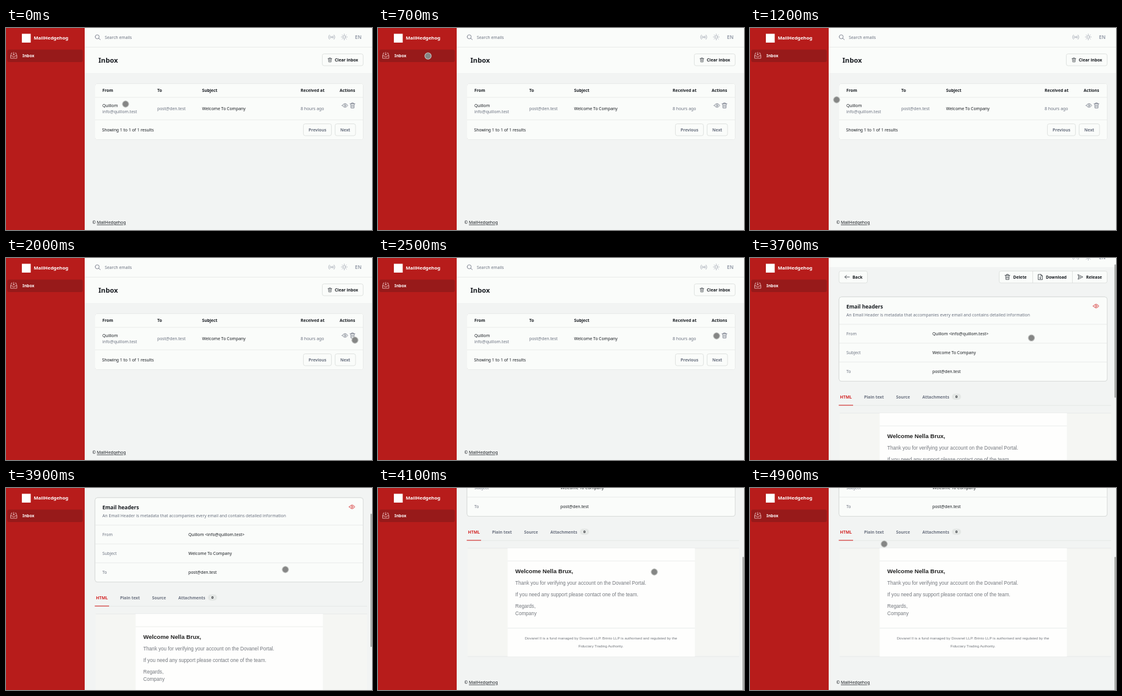
An HTML page that plays this animation: 600 px wide and 332 px high, repeating every 5000 ms.

```html
<!DOCTYPE html>
<html lang="en">
<head>
<meta charset="utf-8">
<title>Inbox</title>
<style>
  html, body { margin: 0; width: 100%; height: 100%; overflow: hidden; background: #f2f4f3; }
  svg { display: block; width: 100vw; height: 100vh; }
  text { font: 6.85px "Noto Sans", "Open Sans", sans-serif; fill: #171b20; }
  .semi { font-weight: 600; font-size: 6.8px; }
  .mid { font-weight: 500; }
  .bold { font-weight: 700; font-size: 6.8px; }
  .grey { fill: #6b7280; }
  .white { fill: #fff; }
  .red { fill: #d32626; }
  .panel { fill: #fafcfa; }
  .box { fill: #fafcfa; stroke: #d5d8d6; stroke-width: .7; }
  .rule { fill: none; stroke: #e1e4e2; stroke-width: .7; }
  .icon { fill: none; stroke: #6b7280; stroke-width: .8; stroke-linecap: round; stroke-linejoin: round; }
  .dark { stroke: #30363d; }
  .mail text { font-family: "Liberation Sans", Arial, sans-serif; font-size: 8.18px; fill: #74787e; }
  .mail .heading { font-size: 9.65px; font-weight: 700; fill: #222; }
  .mail .small { font-size: 6.13px; text-anchor: middle; }
  .shadow { filter: drop-shadow(0 .6px .7px #0003); }
</style>
</head>
<body>
<svg viewBox="0 0 600 332">
  <defs>
    <g id="trash"><path d="M-4-2.8H4M-3-2.8-2.5 4.2H2.5L3-2.8M-1.4-2.8V-4.3H1.4V-2.8M-1-.8V2.2M1-.8V2.2"/></g>
    <g id="eye"><path d="M-4.6 0Q0-6.4 4.6 0Q0 6.4-4.6 0Z"/><circle r="1.5"/></g>
  </defs>
  <rect width="600" height="332" fill="#f2f4f3"/>

  <g id="scroller">
    <rect class="panel shadow" x="129" width="471" height="31"/>
    <g class="icon" style="stroke:#9ca3af">
      <circle cx="534" cy="15" r=".8"/>
      <path d="M532 13Q530.6 15 532 17M530.3 11.5Q527.5 15 530.3 18.5M536 13Q537.4 15 536 17M537.7 11.5Q540.5 15 537.7 18.5"/>
      <circle cx="554.5" cy="14.8" r="2.2"/>
      <path id="rays"/>
    </g>
    <text x="572" y="17.6" class="semi" style="font-size:8px;fill:#9ca3af">EN</text>

    <g id="list">
      <path class="icon" d="M152.1 17.1 154.7 19.2M146.2 14.5A3.3 3.3 0 1 0 152.8 14.5A3.3 3.3 0 1 0 146.2 14.5"/>
      <text x="162" y="17.5" class="grey">Search emails</text>
      <rect class="panel shadow" x="129" y="31.5" width="471" height="42.5"/>
      <text x="151.5" y="56.5" class="bold" style="font-size:11.2px">Inbox</text>
      <rect class="box" x="518.5" y="42.5" width="67" height="19.5" rx="3"/>
      <use href="#trash" class="icon dark" transform="translate(531 52.5) scale(.8)"/>
      <text x="539" y="55" class="semi">Clear inbox</text>

      <rect class="panel shadow" x="146" y="91.5" width="439.5" height="92" rx="4"/>
      <path class="rule" d="M146 114H585.5M146 151H585.5"/>
      <g class="bold-row">
        <text x="158" y="104.5" class="bold">From</text>
        <text x="248" y="104.5" class="bold">To</text>
        <text x="321.5" y="104.5" class="bold">Subject</text>
        <text x="483" y="104.5" class="bold">Received at</text>
        <text x="547" y="104.5" class="bold">Actions</text>
      </g>
      <text x="158" y="129.7">Quillom</text>
      <text x="158" y="139.7" class="grey">info@quillom.test</text>
      <text x="248" y="134.7" class="grey">post@den.test</text>
      <text x="321.5" y="134.7">Welcome To Company</text>
      <text x="483" y="134.7" class="grey">8 hours ago</text>
      <use href="#eye" class="icon" x="555.7" y="127.3"/>
      <use href="#trash" class="icon" x="568" y="127.3"/>
      <text x="157.5" y="169.7">Showing <tspan class="mid">1</tspan> to <tspan class="mid">1</tspan> of <tspan class="mid">1</tspan> results</text>
      <rect class="box" x="487.5" y="157.5" width="46" height="19.5" rx="3"/>
      <text x="496" y="169.7" class="semi grey">Previous</text>
      <rect class="box" x="539.5" y="157.5" width="33.5" height="19.5" rx="3"/>
      <text x="548" y="169.7" class="semi grey">Next</text>
    </g>

    <g id="message">
      <rect class="box" x="146" y="37.5" width="46.5" height="19.5" rx="3"/>
      <path class="icon dark" d="M163 47.2H155.5M158.3 44.4 155.5 47.2 158.3 50"/>
      <text x="168" y="49.7" class="semi">Back</text>
      <rect class="box" x="408.5" y="37.5" width="177" height="19.5" rx="3"/>
      <path class="rule" style="stroke:#d5d8d6" d="M463.5 37.5V57M528.5 37.5V57"/>
      <use href="#trash" class="icon dark" x="422" y="47.2"/>
      <path class="icon dark" d="M472.8 43H477L479.4 45.4V51.6H472.8ZM477 43V45.4H479.4M476 46.5V50M474.7 48.8 476 50 477.3 48.8"/>
      <path class="icon dark" d="M537.8 43.4 545.6 47.2 537.8 51 539 47.2ZM539 47.2H542"/>
      <text x="431.5" y="49.7" class="semi">Delete</text>
      <text x="485" y="49.7" class="semi">Download</text>
      <text x="551" y="49.7" class="semi">Release</text>

      <rect class="box shadow" x="146" y="80" width="439.5" height="138.5" rx="4"/>
      <path class="rule" d="M146 125H585.5M146 156H585.5M146 187H585.5"/>
      <text x="158" y="99" class="semi" style="font-size:8.5px">Email headers</text>
      <text x="158" y="111.7" class="grey">An Email Header is metadata that accompanies every email and contains detailed information</text>
      <use href="#eye" class="icon" style="stroke:#d32626" x="567.3" y="95"/>
      <text x="158" y="142.8" class="mid grey">From</text>
      <text x="299" y="142.8">Quillom &lt;info@quillom.test&gt;</text>
      <text x="158" y="173.8" class="mid grey">Subject</text>
      <text x="299" y="173.8">Welcome To Company</text>
      <text x="158" y="205" class="mid grey">To</text>
      <text x="299" y="205">post@den.test</text>

      <path class="rule" d="M146 258.3H592"/>
      <path d="M145.5 258H169" stroke="#d32626" stroke-width="1.1"/>
      <text x="147.5" y="246.6" class="semi red">HTML</text>
      <text x="187" y="246.6" class="semi grey">Plain text</text>
      <text x="239.5" y="246.6" class="semi grey">Source</text>
      <text x="282.5" y="246.6" class="semi grey">Attachments</text>
      <rect x="331" y="239" width="15" height="10" rx="5" fill="#e4e7e5"/>
      <text x="336.7" y="246.2" class="semi" style="font-size:6px">0</text>

      <g id="mail" class="mail">
        <rect x="147" y="271" width="445" height="178" fill="#f5f6f3"/>
        <path class="rule" d="M147 271H592M147 449H592"/>
        <rect x="212.5" y="271" width="307" height="178" fill="#fefefd"/>
        <path class="rule" d="M212.5 292H519.5M212.5 402.3H519.5"/>
        <text x="225" y="312.2" class="heading">Welcome Nella Brux,</text>
        <text x="225" y="331">Thank you for verifying your account on the Dovanel Portal.</text>
        <text x="225" y="349.8">If you need any support please contact one of the team.</text>
        <text x="225" y="368.8">Regards,</text>
        <text x="225" y="381">Company</text>
        <text x="365.5" y="421.4" class="small">Dovanel II is a fund managed by Dovanel LLP. Brinto LLP is authorised and regulated by the</text>
        <text x="365.5" y="434" class="small">Fiduciary Trading Authority.</text>
      </g>
    </g>
    <text id="footer" x="141.5" y="322.4">© <tspan text-decoration="underline">MailHedgehog</tspan></text>
  </g>

  <rect id="scrollbar" x="597.7" width="1.8" height="219" rx=".9" fill="#8f9190"/>

  <rect width="129" height="332" fill="#b71c1b"/>
  <rect x="26" y="9.5" width="14.5" height="14.5" fill="#fff"/>
  <text x="45.5" y="19.3" class="bold white" style="font-size:7.8px">MailHedgehog</text>
  <rect x="2" y="35.5" width="124" height="20.5" rx="3" fill="#971a1a"/>
  <path class="icon" style="stroke:#f3caca" d="M10 41H9L7.6 45.8V49.8H17.8V45.8L16.4 41H15.4M7.6 45.8H10.4L11.4 47.4H14L15 45.8H17.8M12.7 40V44.4M11.2 43 12.7 44.5 14.2 43"/>
  <text x="27" y="48.1" class="semi white">Inbox</text>

  <circle id="cursor" r="5.2" fill="#858685" stroke="#c3c5c3" stroke-width="1.1"/>
</svg>
<script>
const LOOP = 5000, STEP = 100;
const OPENED = 2700, MAIL_LOADED = 3100, SCROLL_START = 3700;

// Each stop is [time, value, ...]
const cursorStops = [
  [100, 196, 125], [200, 180, 115], [400, 98, 63], [500, 80, 52], [600, 80, 52], [700, 82, 46],
  [800, 82, 46], [1000, 102, 82], [1200, 142, 118], [1400, 221, 148], [1600, 340, 160],
  [1800, 530, 150], [1900, 576, 139], [2000, 572, 135], [2500, 555, 128], [3100, 555, 128],
  [3300, 538, 121], [3600, 463, 130], [3900, 458, 134], [4100, 453, 138], [4200, 451, 138],
  [4400, 400, 139], [4600, 285, 126], [4800, 229, 110], [4900, 220, 92]
];
const scrollStops = [[3600, 0], [3800, 32], [3900, 64], [4000, 122], [4100, 172]];

const $ = id => document.getElementById(id);
const show = (id, visible) => $(id).setAttribute("display", visible ? "inline" : "none");
const move = (id, x, y) => $(id).setAttribute("transform", `translate(${x} ${y})`);

function sample(stops, time) {
  const next = stops.findIndex(stop => stop[0] > time);
  if (next === 0) return stops[0].slice(1);
  if (next < 0) return stops.at(-1).slice(1);
  const a = stops[next - 1], b = stops[next];
  const k = (time - a[0]) / (b[0] - a[0]);
  return a.slice(1).map((v, i) => v + (b[i + 1] - v) * k);
}

$("rays").setAttribute("d", Array.from({ length: 8 }, (_, i) => {
  const c = Math.cos(i * Math.PI / 4), s = Math.sin(i * Math.PI / 4);
  return `M${554.5 + 3.6 * c} ${14.8 + 3.6 * s}L${554.5 + 4.8 * c} ${14.8 + 4.8 * s}`;
}).join(""));

function draw(now) {
  const time = Math.floor((now % LOOP) / STEP) * STEP;
  const [scroll] = sample(scrollStops, time);
  show("list", time < OPENED);
  show("message", time >= OPENED);
  show("mail", time >= MAIL_LOADED);
  show("scrollbar", time >= SCROLL_START);
  $("footer").setAttribute("y", time < MAIL_LOADED ? 322.4 : 494.4);
  move("scroller", 0, -scroll);
  move("scrollbar", 0, scroll * 332 / 504);
  move("cursor", ...sample(cursorStops, time));
}

const start = performance.now();
function tick() {
  draw(performance.now() - start);
  requestAnimationFrame(tick);
}
tick();
</script>
</body>
</html>
```
